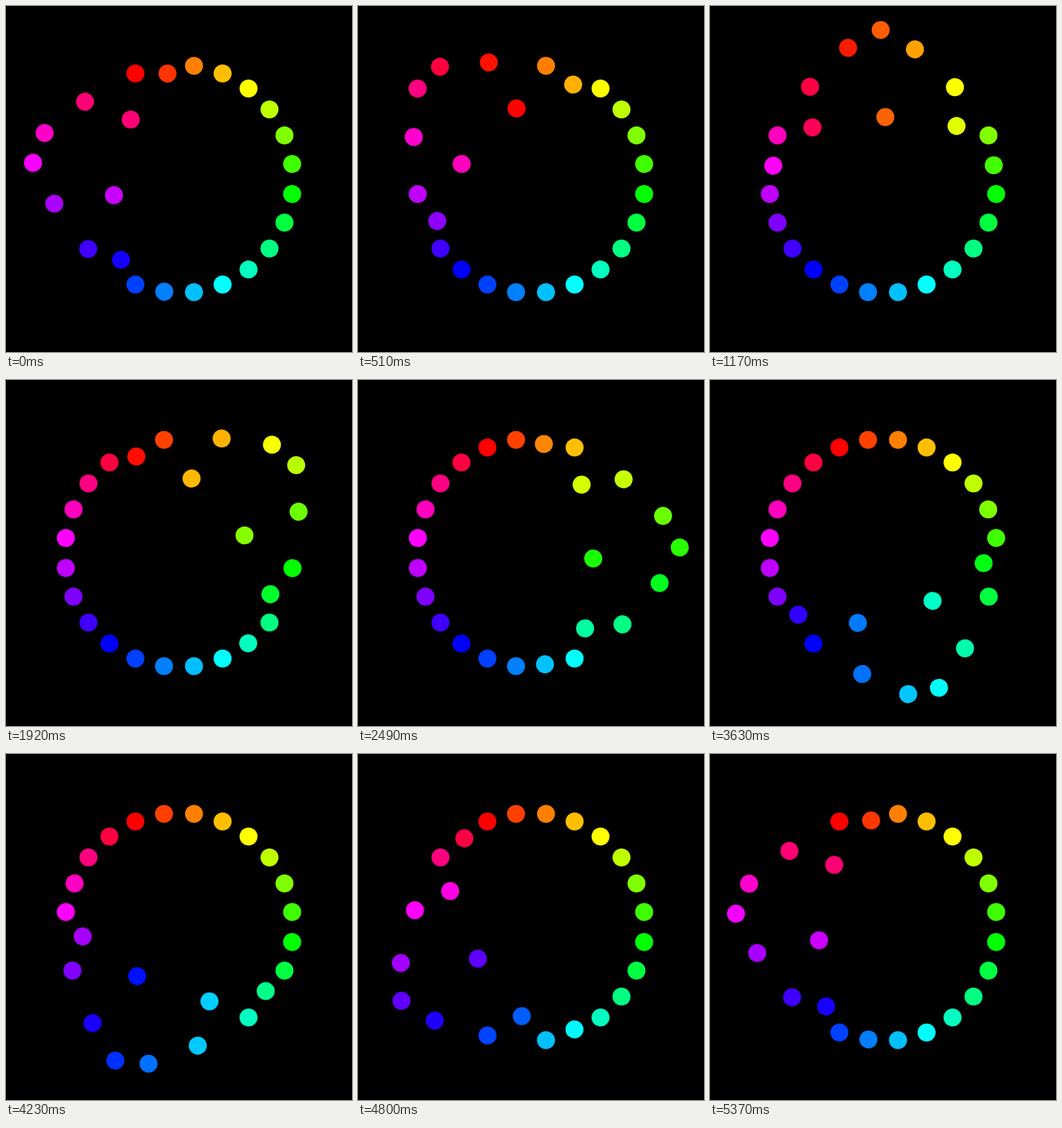
Recreate the animation shown at these times as an HTML page. Size 500 by 500 pixels, loop 5400 ms.

```html
<!DOCTYPE html>
<html lang="en">
<head>
<meta charset="utf-8">
<title>Swapping ring of dots</title>
<style>
  @property --swap {
    syntax: "<number>";
    inherits: true;
    initial-value: 0;
  }

  html, body {
    margin: 0;
    width: 100%;
    height: 100%;
    overflow: hidden;
    background: #000;
  }

  .ring {
    position: relative;
    width: 500px;
    height: 500px;
  }

  /* Each pair turns half a circle about the middle of its chord:
     ring radius 165, dots 22.5 degrees either side of the pair's angle. */
  .pair {
    --hue: calc(var(--n) * 30);
    position: absolute;
    left: 250px;
    top: 250px;
    width: 0;
    height: 0;
    transform: rotate(calc(var(--n) * 30deg)) translateY(-152.44px) rotate(calc(var(--swap) * 180deg));
    animation: swap 5400ms calc(var(--n) * 450ms - 5377ms) infinite;
  }

  .pair::before, .pair::after {
    content: "";
    position: absolute;
    top: -13px;
    width: 26px;
    height: 26px;
    border-radius: 50%;
  }

  .pair::before {
    left: calc(63.14px - 13px);
    background: hsl(calc(var(--hue) + 45 - 45 * var(--swap)) 100% 50%);
  }

  .pair::after {
    left: calc(-63.14px - 13px);
    background: hsl(calc(var(--hue) + 45 * var(--swap)) 100% 50%);
  }

  @keyframes swap {
    0% { --swap: 0; animation-timing-function: cubic-bezier(.45, 0, .55, 1); }
    43.333%, 100% { --swap: 1; }
  }
</style>
</head>
<body>
<div class="ring"></div>
<script>
  const ring = document.querySelector(".ring");
  for (let n = 0; n < 12; n++) {
    const pair = document.createElement("div");
    pair.className = "pair";
    pair.style.setProperty("--n", n);
    ring.append(pair);
  }
</script>
</body>
</html>
```
